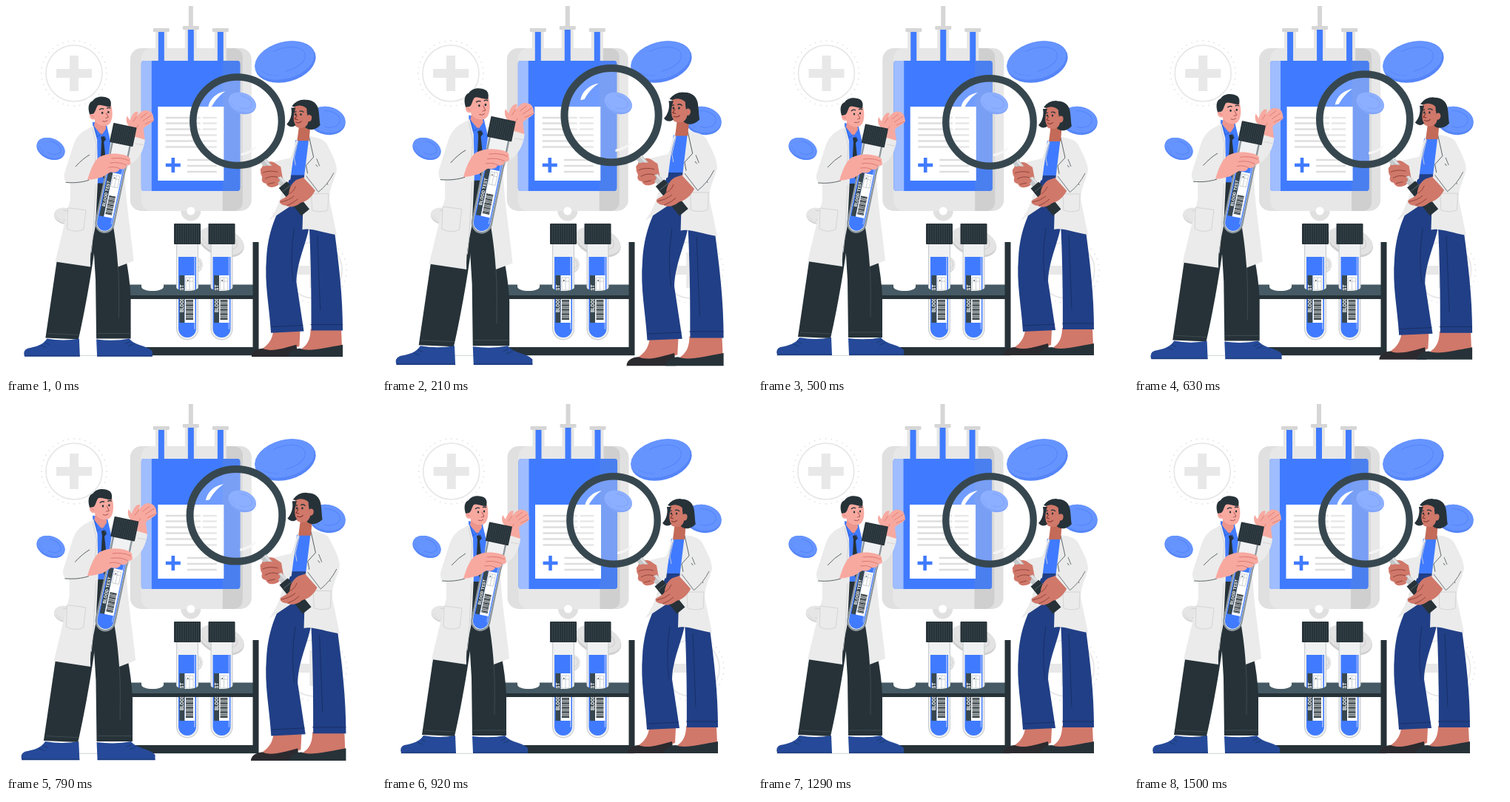
An HTML page with a canvas that plays this animation: 500x500 px, repeating every 1.54 s.

```html
<!DOCTYPE html>
<html lang="en">
<head>
<meta charset="utf-8">
<title>Blood test</title>
<style>
html, body { margin: 0; width: 100%; height: 100%; overflow: hidden; background: #fff; }
canvas { display: block; width: 100vw; height: 100vh; }
</style>
</head>
<body>
<canvas id="stage"></canvas>
<script>
const LOOP = 1540, FPS = 24, LEAD = 30, CYCLE = 1500;
const DARK = '#263238', SLATE = '#37474f', SHELF = '#455a64', BLUE = '#407bff';
const CELL = '#6694ff', CELL_SIDE = '#5585f8';
const COAT = '#ebebeb', SEAM = '#d2d2d2', NAVY = '#213f86', SHOE = '#264a99';
const PINK = '#f7a9a0', PINK_LINE = '#d9756d', TAN = '#d0786a', TAN_LINE = '#8c4036';

// [time, value, softness of the way to the next key]
const SHAKE = [0, -1, 2, -4, 4, -4, 4, -4, 2, -1, 0].map((v, i) => [i * 150, v, 0]);
const BEAT = [[0, 0, 1], [150, 1, .5], [450, 0, 1], [600, 0, 1], [750, 1, 1], [900, 0, 1], [CYCLE, 0, 1]];

const canvas = document.getElementById('stage');
const ctx = canvas.getContext('2d');

function track(keys, t) {
  let i = 0;
  while (i < keys.length - 2 && t >= keys[i + 1][0]) i++;
  const [t0, v0, soft] = keys[i], [t1, v1] = keys[i + 1];
  const u = Math.min(1, (t - t0) / (t1 - t0));
  const eased = u * u * (3 - 2 * u);
  return v0 + (v1 - v0) * (u + (eased - u) * soft);
}

function fill(d, color) {
  ctx.fillStyle = color;
  ctx.fill(new Path2D(d));
}

function line(d, color, width = 1) {
  ctx.strokeStyle = color;
  ctx.lineWidth = width;
  ctx.stroke(new Path2D(d));
}

function rect(x, y, w, h, color, radius = 0) {
  ctx.fillStyle = color;
  ctx.beginPath();
  ctx.roundRect(x, y, w, h, radius);
  ctx.fill();
}

function ellipse(x, y, rx, ry, color, angle = 0) {
  ctx.fillStyle = color;
  ctx.beginPath();
  ctx.ellipse(x, y, rx, ry, angle, 0, 7);
  ctx.fill();
}

function ring(x, y, rx, ry, color, width, angle = 0, from = 0, to = 7) {
  ctx.strokeStyle = color;
  ctx.lineWidth = width;
  ctx.beginPath();
  ctx.ellipse(x, y, rx, ry, angle, from, to);
  ctx.stroke();
}

function group(draw, x, y, sx = 1, sy = sx, angle = 0) {
  ctx.save();
  ctx.translate(x, y);
  ctx.rotate(angle);
  ctx.scale(sx, sy);
  draw();
  ctx.restore();
}

const scaled = (draw, x, y, s) => group(() => { ctx.translate(-x, -y); draw(); }, x, y, s);

function plus(x, y, size, arm, color) {
  rect(x - size / 2, y - arm / 2, size, arm, color);
  rect(x - arm / 2, y - size / 2, arm, size, color);
}

function badge(x, y) {
  ring(x, y, 38, 38, '#e6e6e6', 1.6);
  for (let a = 0; a < 36; a++) {
    const angle = a * Math.PI / 18;
    ellipse(x + 44 * Math.cos(angle), y + 44 * Math.sin(angle), .9, .9, '#e3e3e3');
  }
  plus(x, y, 48, 12, '#e8e8e8');
}

function cell(x, y, rx, ry, angle, top, side) {
  group(() => {
    ellipse(0, 0, rx, ry, side);
    ellipse(-rx * .01, -ry * .08, rx * .98, ry * .91, top);
    ring(0, -ry * .12, rx * .68, ry * .58, side, 1.1, 0, -2, 1.7);
    ring(-rx * .05, -ry * .1, rx * .8, ry * .7, side, .6, 0, 1.9, 2.8);
    for (const [dx, dy] of [[-.4, .62], [-.1, .72], [.25, .66]]) ellipse(rx * dx, ry * dy, .6, .6, side);
  }, x, y, 1, 1, angle);
}

function port(x, top) {
  rect(x - 8, top + 4, 16, 43, '#e6e6e6');
  rect(x - 4, top + 5, 8, 42, BLUE);
  rect(x - 11, top, 22, 5, '#d6d6d6', 1);
}

function bag() {
  rect(247, 0, 6, 28, '#d6d6d6');
  ellipse(250, 277, 13.5, 13.5, '#e0e0e0');
  rect(168, 57, 164, 220, '#e0e0e0', 15);
  rect(183, 57, 110, 220, '#e7e7e7', [14, 0, 0, 14]);
  rect(293, 57, 27, 220, '#cfcfcf', [0, 12, 12, 0]);
  ellipse(250, 277, 5.5, 5.5, '#fff');
  port(210, 30);
  port(290, 30);
  port(250, 27);
  rect(183, 74, 133.5, 176, BLUE, 4);
  rect(183, 74, 14, 176, '#9fbdff', [4, 0, 0, 4]);
  rect(293, 74, 23.5, 176, '#4a7ff0', [0, 4, 4, 0]);
  rect(205.5, 136, 89, 100, '#fff');
  [151, 158.5, 166.5, 174.5, 182.5, 190.5].forEach((y, i) => {
    if (i < 3) {
      rect(216, y - 1.2, 47, 2.4, '#dedede');
      rect(266, y - 1.2, 19, 2.4, '#dedede');
    } else rect(216, y - 1.2, 69, 2.4, '#dedede');
  });
  for (const y of [208, 216, 224]) rect(245, y - 1.2, 40, 2.4, '#dedede');
  plus(226, 215, 20, 4.6, BLUE);
}

// Origin: middle of the cap's top edge
function tube(glass, rim) {
  const inner = 15 - rim;
  rect(-15, 22, 30, 135.5, glass, [0, 0, 15, 15]);
  rect(-inner, 24, inner * 2, 133.5 - rim, '#f0f1f2', [0, 0, inner, inner]);
  rect(-12, 45, 24, 109, BLUE, [0, 0, 12, 12]);
  rect(9, 45, 2, 98, '#87abff', 1);
  rect(-10.5, 70, 7, 64, SLATE);
  rect(-3.5, 70, 13.5, 64, '#fff');
  line('M-2 73H8V90H-2ZM-2 78H8M3 73V90', '#a9b1b5', .6);
  for (let i = 0; i < 14; i++) rect(-2, 103 + i * 2, 10, i % 3 ? 1.1 : 1.6, DARK);
  rect(0, 76, 1.4, 1.4, DARK);
  rect(-18, 0, 36, 28, DARK, 1);
  for (let x = -15; x < 17; x += 3) rect(x, 1, .8, 26, '#3b494f');
  ctx.save();
  ctx.translate(-7, 120);
  ctx.rotate(-Math.PI / 2);
  ctx.font = 'bold 6.4px Roboto, Arial, sans-serif';
  ctx.textBaseline = 'middle';
  ctx.fillStyle = '#fff';
  ctx.fillText('BLOOD TEST', 0, .3);
  ctx.restore();
}

function rack() {
  line('M25 472.3H341', '#b9c0c4', .7);
  rect(150, 376.5, 184, 15, SHELF);
  fill('M183 376H213V379C213 387 183 387 183 379Z', '#fff');
  for (const x of [245, 291.5]) {
    group(() => {
      tube('#c9ced1', 1.2);
      fill('M-15.5 85C-15.5 93 15.5 93 15.5 85V98H-15.5Z', SHELF);
    }, x, 294);
  }
  rect(150, 391, 184, 5, DARK);
  rect(160, 461, 181, 11, DARK);
  rect(333.5, 319, 8, 153, DARK);
}

function man() {
  // legs and shoes
  fill('M70 338L122 250L123 300C119 340 109 400 98 449L54 447Z', DARK);
  fill('M122 238H135L150 296C159 326 166 355 168 392L168 448H122L121 370L118 320Z', DARK);
  line('M57 441L99 443M123 441H168M151 352C153 380 152 400 152 420', '#46545a', .7);
  fill('M56 448Q78 452 99 448L100 472H26Q23 464 30 461C42 459 51 456 56 448Z', SHOE);
  fill('M122 449Q147 452 166 448C174 458 190 457 197 465V472H123Z', SHOE);
  line('M26 471H100M123 471H197M48 457L55 460M53 453L59 456M160 455L167 452M164 458L172 455', '#1a336b', .8);
  // raised arm and hand
  fill('M173 182L172 167C165 166 160 158 163 150L167 156C169 149 174 142 178 145L176 151C181 144 187 141 190 143C194 143 197 146 198 150L199 156C195 161 188 163 185 167L187 183Z', PINK);
  line('M176 151L171 158M190 146L181 153M196 149L184 157M198 156L187 161M170 166Q177 168 178 162', PINK_LINE, .8);
  fill('M140 172L158 190L174 178L187 182C186 193 180 210 165 216L160 226C161 265 169 310 172 344L151 352C149 320 143 278 133 250L134 185Z', COAT);
  line('M174 187L185 189M160 226L165 214', SEAM, .9);
  // shirt, tie and coat front
  fill('M117 158L136 163L141 185L133 240H122L117 178Z', BLUE);
  fill('M128 178L133 177L135 181L132 185L136 222L132 235L127 220L129 184Z', DARK);
  fill('M118 163L109 168C99 173 94 181 91 190L79 228C78 238 82 240 87 240V262L67 345L114 352C113 327 119 310 121 295L124 234L123 182Z', COAT);
  line('M117 167L122 190L120 214M121 242C119 280 118 310 115 333', SEAM, .9);
  line('M81 239C93 240 102 239 112 236M94 218Q104 207 113 202', '#50585c', .9);
  line('M84 273L108 276L105 302Q94 307 83 301Z', SEAM, .9);
  // head
  fill('M121 152L134 160L135 167L129 176L119 164Z', '#ec958c');
  fill('M115 140C118 131 137 127 142 137C145 148 143 161 136 163C128 165 121 160 119 154Z', PINK);
  ellipse(117, 150, 4, 5, PINK, -.3);
  fill('M113 148C110 138 112 132 117 130C123 122 134 124 139 127C142 130 142 134 141 138C134 138 128 134 124 136C121 140 121 145 118 147Z', DARK);
  ellipse(130, 146, 1.2, 1.6, DARK);
  ellipse(138, 145, 1.2, 1.6, DARK);
  line('M126 142Q129 139 132 141M136 140Q139 138 141 140', DARK, 1.3);
  line('M135 146L138 152L134 153M130 157Q134 159 137 156', '#a34c48', .9);
  line('M115 149L119 152', PINK_LINE, .8);
  line('M119 164L123 178L129 174L136 183', '#285acb', .8);
  // tube with the hand on it
  group(() => tube('#8c969c', 2.6), 160.5, 162.5, .88, .935, .205);
  fill('M110 236C114 222 119 210 126 205C138 199 149 200 158 202C163 203 169 206 167 210C169 213 168 217 162 216C163 220 158 222 153 221C151 226 146 226 141 225L130 232Q120 235 110 236Z', PINK);
  line('M142 207Q156 205 166 210M140 213Q153 211 162 216M138 219Q147 217 154 221', PINK_LINE, .9);
}

function magnifier() {
  ellipse(313, 157, 57, 57, 'rgba(255,255,255,.25)');
  fill('M274 138C276 127 285 119 297 117C288 123 283 130 279 137Z', '#fff');
  fill('M318 200C326 198 333 195 339 190C336 197 327 202 318 203Z', '#f5f5f5');
  ring(313, 157, 59.2, 59.2, SLATE, 9.4);
  line('M348 210L375 242', '#c5c9cb', 9);
  line('M350 209L376 239', '#e3e5e6', 2);
  line('M374 242L404 279', DARK, 14);
  line('M374 251L385 242', '#526068', 1);
}

function woman() {
  // feet and legs
  fill('M361 438H397L396 458L365 468L336 467C348 461 359 455 361 438Z', TAN);
  fill('M411 435H452L453 460L420 467L388 467C402 461 411 455 411 435Z', TAN);
  fill('M332 472C332 465 340 461 347 461C358 466 374 461 392 456L394 472Z', '#2b2a2f');
  fill('M381 472C382 464 390 461 397 461C409 466 430 460 454 456V472Z', DARK);
  fill('M409 294L443 304C449 350 454 390 454 437H412C412 400 412 350 409 294Z', NAVY);
  fill('M385 227H404L411 285C409 315 393 340 392 372L402 438L358 440C356 405 349 375 352 340C354 305 364 286 370 272Z', NAVY);
  line('M358 432L401 430M411 429H454M389 300Q383 340 388 372M420 310L424 410', '#162c60', .8);
  // shirt and coat
  fill('M391 182H411L404 229H384Z', BLUE);
  fill('M394 179C388 188 388 199 384 206L362 211L372 240L384 235C386 222 387 203 394 183ZM380 240L391 266L355 290C363 280 370 265 373 250Z', COAT);
  fill('M409 177C424 179 431 182 434 190C441 204 445 211 446 222C443 238 434 248 437 266L446 309C427 306 410 299 400 302L402 235Z', COAT);
  line('M409 178L415 205L405 216L407 227M418 215Q426 224 434 242M421 249L442 223', '#50585c', .9);
  line('M412 254H435L434 276Q423 280 413 276Z', SEAM, .9);
  line('M394 184L389 206L391 216', SEAM, .9);
  // head
  fill('M396 160L411 158L409 183H393Z', '#c46a58');
  fill('M386 137C398 124 421 125 422 145C423 153 423 160 424 162C416 171 406 169 403 164L398 140Z', DARK);
  fill('M388 139C395 133 407 137 409 146C410 157 407 167 398 166C390 166 387 160 387 152Z', TAN);
  fill('M386 137C393 133 400 133 406 137C405 148 409 154 408 160L413 160L416 135L403 128Q392 128 386 137Z', DARK);
  fill('M385 139C387 149 383 157 379 161C383 166 389 165 391 162C387 157 388 148 391 139Z', DARK);
  ellipse(409, 153, 3.5, 4.5, TAN, .2);
  ellipse(391, 148, 1.2, 1.6, DARK);
  ellipse(398, 148, 1.2, 1.6, DARK);
  line('M388 145L392 144M396 144Q399 142 402 145', DARK, 1.2);
  line('M393 149L390 154L394 155M391 158Q395 161 399 157', '#7c2f2a', 1);
  // hands around the handle
  fill('M362 212C355 209 347 213 346 219C343 224 344 229 347 231C344 236 347 240 351 240C354 247 361 246 367 243L374 235L371 218Z', TAN);
  magnifier();
  fill('M346 219C350 215 357 217 365 217C373 218 373 224 366 225C375 226 374 232 366 232C373 235 369 241 362 240C356 245 350 241 351 236C346 234 344 228 347 226C343 224 343 221 346 219Z', TAN);
  line('M347 226Q356 222 367 225M350 234Q358 229 367 232M354 241L363 239', TAN_LINE, .9);
  fill('M405 231L420 243C416 255 408 264 398 266C391 272 383 273 379 270C374 270 368 267 370 263C374 260 379 259 382 254C382 246 387 238 393 235Z', TAN);
  line('M383 254Q389 250 391 244M371 265Q382 263 389 257M379 270Q389 266 394 261', TAN_LINE, .9);
  fill('M402 233L415 218L444 218C442 232 430 246 421 254L412 244Z', COAT);
  line('M405 230L421 251M421 252Q434 242 442 226M419 207L423 217', '#50585c', .8);
}

function draw(ms) {
  const frame = Math.floor((ms % LOOP + 5) * FPS / 1000);
  const t = Math.min(frame * 1000 / FPS + LEAD, CYCLE);
  const size = 1 + .1 * track(BEAT, t);
  const ratio = window.devicePixelRatio || 1;
  const w = Math.round(innerWidth * ratio), h = Math.round(innerHeight * ratio);
  if (canvas.width !== w || canvas.height !== h) {
    canvas.width = w;
    canvas.height = h;
  }
  ctx.setTransform(w / 500, 0, 0, h / 500, 0, 0);
  ctx.fillStyle = '#fff';
  ctx.fillRect(0, 0, 500, 500);

  group(() => {
    badge(92.2, 91);
    badge(416.5, 357);
    bag();
    cell(256, 350, 10, 11, .3, '#e6e6e6', '#d4d4d4');
    cell(291, 319, 32, 19, .33, '#e3e3e3', '#cfcfcf');
    cell(80, 284, 15, 11, .2, '#e6e6e6', '#d4d4d4');
  }, track(SHAKE, t), 0);

  cell(377.5, 75.5, 42, 27, -.27, CELL, CELL_SIDE);
  cell(434, 155, 25, 19, .2, CELL, CELL_SIDE);
  cell(60.5, 193, 20, 14, .4, CELL, CELL_SIDE);
  cell(319, 131.5, 19.5, 14, .35, CELL, CELL_SIDE);
  rack();
  scaled(man, 112, 298, size);
  scaled(woman, 352, 282.5, size);
}

function tick() {
  draw(performance.now());
  requestAnimationFrame(tick);
}
tick();
</script>
</body>
</html>
```
